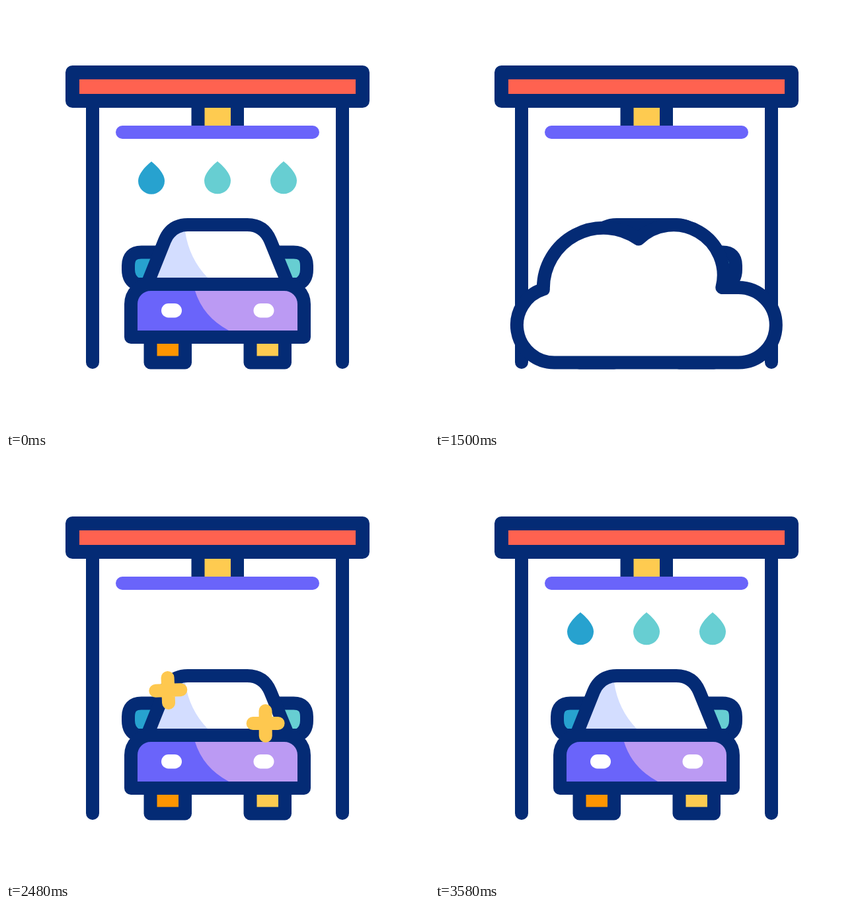
An HTML page for the animation above (3600 ms loop, 640x640 px).

```html
<!DOCTYPE html>
<html lang="en">
<head>
<meta charset="utf-8">
<title>Car wash</title>
<style>
  html, body { margin: 0; width: 100%; height: 100%; overflow: hidden; background: #fff; }
  svg { display: block; width: 100vw; height: 100vh; }
  .line { stroke: #042b75; stroke-width: 20; stroke-linejoin: round; stroke-linecap: round; }
</style>
</head>
<body>
<svg viewBox="0 0 640 640">
  <defs>
    <clipPath id="belowBar"><rect y="191" width="640" height="449"/></clipPath>
    <path id="drop" d="M0 0C-5 4-20 17-20 29.3A20 20 0 0 0 20 29.3C20 17 5 4 0 0Z"/>
    <path id="plus" d="M-19 0H19M0-19V19" fill="none" stroke="#fec84f" stroke-width="20" stroke-linecap="round"/>
    <path id="mirror" d="M235 372.5H205Q185 372.5 185 393V399Q185 415 198 421H218Z"/>
    <rect id="wheel" x="218.5" y="501" width="52.5" height="38.5"/>
    <rect id="lamp" x="235" y="450" width="31" height="21.5" rx="10.7" fill="#fff"/>
  </defs>

  <g clip-path="url(#belowBar)">
    <use class="drop" href="#drop" fill="#27a2cf"/>
    <use class="drop" href="#drop" fill="#67ced2"/>
    <use class="drop" href="#drop" fill="#67ced2"/>
  </g>

  <rect x="280.5" y="143" width="79.500" height="40" fill="#042b75"/>
  <rect x="300.5" y="143" width="39.500" height="40" fill="#fecb50"/>
  <g class="line">
    <path d="M131 145V539M509 145V539"/>
    <path d="M176 191H464" style="stroke:#6a64fa"/>
    <rect x="100.5" y="100.5" width="439" height="43" fill="#ff6250" style="stroke-width:21"/>
  </g>

  <g class="line">
    <use href="#wheel" fill="#ff9500"/>
    <use href="#wheel" x="151" fill="#fecb50"/>
    <use href="#mirror" fill="#27a2cf"/>
    <use href="#mirror" fill="#67ced2" transform="matrix(-1 0 0 1 640 0)"/>
  </g>
  <path d="M216 421L240 355Q250 331 275 331H365Q390 331 400 355L425 421Z" fill="#fff"/>
  <path d="M216 421L240 355Q250 331 271 331V341Q277 382 305 411V421Z" fill="#d3ddff"/>
  <path class="line" d="M216 415L240 355Q250 331 275 331H365Q390 331 400 355L424.500 415" fill="none"/>
  <path d="M189 501V451Q189 421 219 421H421Q451 421 451 451V501Z" fill="#bb9af3"/>
  <path d="M189 501V451Q189 421 219 421H284L286 431Q298 470 337 491V501Z" fill="#6a64fa"/>
  <path class="line" d="M189 501V451A30 30 0 0 1 219 421H421A30 30 0 0 1 451 451V501Z" fill="none"/>
  <use href="#lamp"/>
  <use href="#lamp" x="139.500"/>

  <path id="cloud" class="line" fill="#fff" vector-effect="non-scaling-stroke"
    d="M-183-130A107 107 0 0 1-14-219A89 89 0 0 1 134-133H163A66.500 66.500 0 0 1 163 0H-162A66.500 66.500 0 0 1-183-130Z"/>
  <use class="star" href="#plus"/>
  <use class="star" href="#plus"/>
</svg>
<script>
  const LOOP = 3600;
  const drops = [...document.querySelectorAll('.drop')];
  const stars = [...document.querySelectorAll('.star')];
  const cloud = document.getElementById('cloud');
  const ramp = (t, from, to) => Math.min(1, Math.max(0, (t - from) / (to - from)));

  const dropX = [220, 320, 420];
  const firstDelay = [0, 120, 60];
  const secondStart = [613, 994, 777];

  function dropY(t, i) {
    if (t >= 3270) return 152 + 83 * ramp(t, 3270, 3580);
    if (t >= secondStart[i]) return Math.min(430, 152 + 0.36 * (t - secondStart[i]));
    return Math.min(430, 235 + 0.36 * Math.max(0, t - firstDelay[i]));
  }

  function drawStar(star, t, x) {
    const p = (t - 2220) / 580;
    const size = ramp(t, 2060, 2190);
    star.setAttribute('transform',
      `translate(${x - 6 * p} ${411 - 129 * p}) rotate(${-5 * p}) scale(${size})`);
    star.setAttribute('opacity', size ? 1 - ramp(t, 2850, 3010) : 0);
  }

  function draw(t) {
    drops.forEach((drop, i) =>
      drop.setAttribute('transform', `translate(${dropX[i]} ${dropY(t, i)})`));

    const grow = ramp(t, 180, 1728);
    cloud.setAttribute('transform', `translate(320 539.5) scale(${Math.max(grow, 0.001)})`);
    cloud.setAttribute('opacity', grow ? 1 - ramp(t, 2040, 2440) : 0);

    drawStar(stars[0], t, 248);
    drawStar(stars[1], t - 225, 393);
  }

  const start = performance.now();
  function tick() {
    draw((performance.now() - start) % LOOP);
    requestAnimationFrame(tick);
  }
  tick();
</script>
</body>
</html>
```
